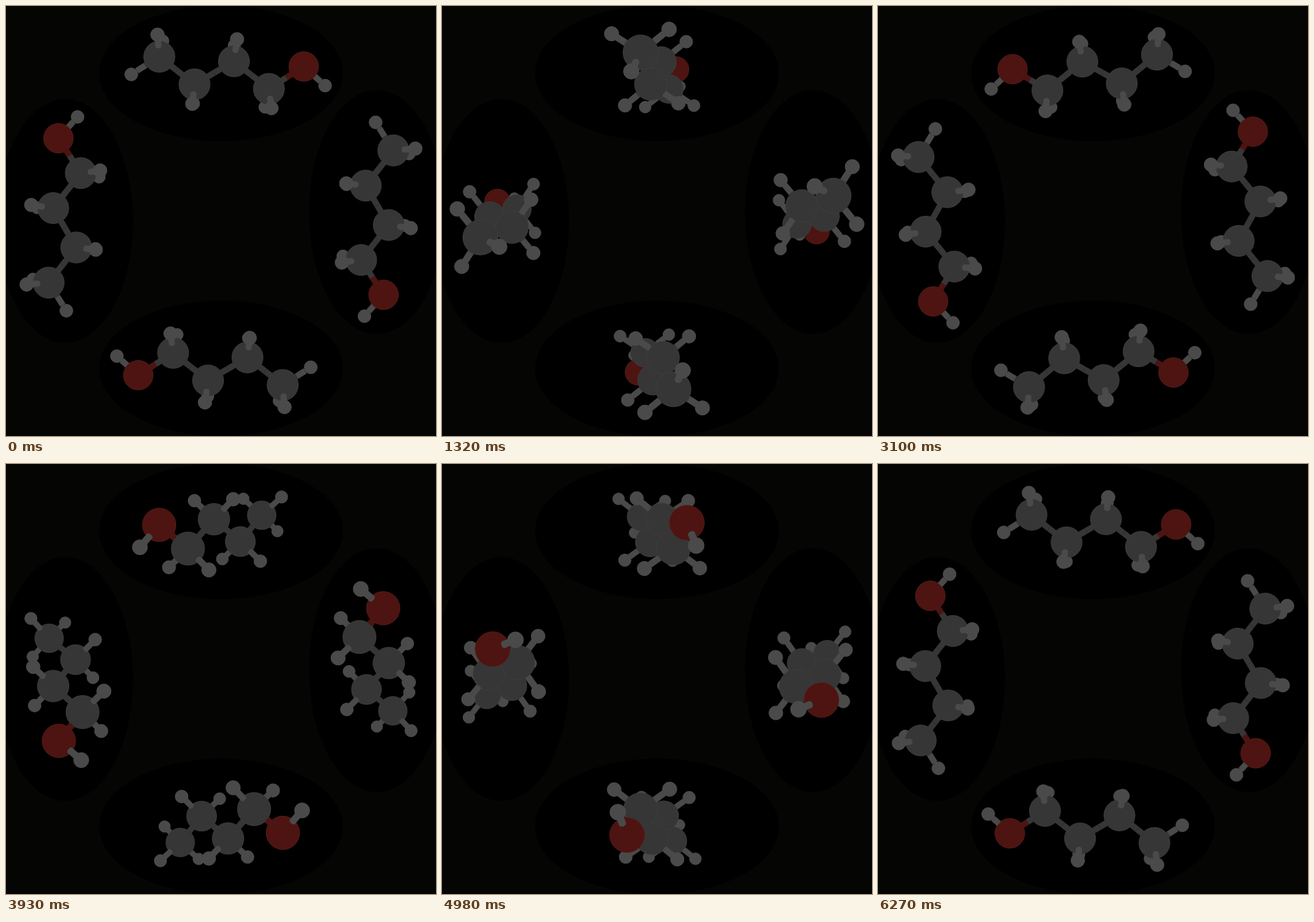
An HTML page with a canvas for the animation above (6300 ms loop, 748x748 px).

```html
<!DOCTYPE html>
<html lang="en">
<head>
<meta charset="utf-8">
<title>Rotating molecule, four views</title>
<style>
  html, body { margin: 0; width: 100%; height: 100%; overflow: hidden; background: #050504; }
  canvas { display: block; width: 748px; height: 748px; }
</style>
</head>
<body>
<canvas id="stage" width="748" height="748"></canvas>
<script>
const ctx = document.getElementById('stage').getContext('2d');

const LOOP = 6300, FRAMES = 191;
const CAMERA = 944;         // viewing distance in px
const AXIS_X = 2, HORIZON = 18, ROLL = 0.0165;
const BOND_RADIUS = 5.3;
const DEG = Math.PI / 180;

const KINDS = {
  C: { radius: 27.6, fill: '#363636', edge: '#3e3e3a' },
  O: { radius: 26.4, fill: '#4d1411', edge: '#571d19' },
  H: { radius: 11.8, fill: '#4a4a4a', edge: '#4c4c49' }
};

// kind, x, y, z, index of the atom it is bonded to
const ATOMS = [
  ['O', 142.5, -27.5, 0, 1],
  ['C', 81.5, 10.5, 0, 2],
  ['C', 20.5, -38.5, 0, 3],
  ['C', -48, 0.5, 0, 4],
  ['C', -109, -48.5, 0, -1],
  ['H', 180, 6.5, 0, 0],
  ['H', 80.3, 42, 48, 1],
  ['H', 79.5, 44.3, -46, 1],
  ['H', 23.5, -73, 45, 2],
  ['H', 23.5, -69.5, -47, 2],
  ['H', -50.5, 32.5, 47, 3],
  ['H', -51, 35.5, -44, 3],
  ['H', -157.5, -18.5, 0, 4],
  ['H', -108, -82.5, 45, 4],
  ['H', -107, -79.5, -48, 4]
].map(([kind, x, y, z, parent]) => ({ ...KINDS[kind], x, y, z, parent }));

// centre and turn of each copy
const VIEWS = [[374, 117, 0], [645, 358.5, 90], [374, 630.5, 180], [103, 374, -90]];

function rotate(atom, angle) {
  const c = Math.cos(angle), s = Math.sin(angle);
  return { ...atom, x: atom.x * c + atom.z * s + AXIS_X, z: atom.z * c - atom.x * s };
}

function project(p) {
  const scale = CAMERA / (CAMERA - p.z);
  const x = p.x * scale;
  return { x, y: HORIZON + p.y * scale - ROLL * x, scale };
}

function mix(a, b, t) {
  return { x: a.x + (b.x - a.x) * t, y: a.y + (b.y - a.y) * t, z: a.z + (b.z - a.z) * t };
}

function drawBall(atom) {
  const p = project(atom);
  ctx.beginPath();
  ctx.arc(p.x, p.y, atom.radius * p.scale - 0.5, 0, 2 * Math.PI);
  ctx.fillStyle = atom.fill;
  ctx.fill();
  ctx.strokeStyle = atom.edge;
  ctx.stroke();
}

// Cylinder between two points; slant rounds its ends by foreshortening
function drawRod(from, to, slant, fill) {
  const a = project(from), b = project(to);
  const dir = Math.atan2(b.y - a.y, b.x - a.x);
  const ra = BOND_RADIUS * a.scale, rb = BOND_RADIUS * b.scale;
  const nx = -Math.sin(dir), ny = Math.cos(dir);
  ctx.fillStyle = fill;
  ctx.beginPath();
  ctx.moveTo(a.x + nx * ra, a.y + ny * ra);
  ctx.lineTo(b.x + nx * rb, b.y + ny * rb);
  ctx.lineTo(b.x - nx * rb, b.y - ny * rb);
  ctx.lineTo(a.x - nx * ra, a.y - ny * ra);
  ctx.fill();
  for (const [p, r] of [[a, ra], [b, rb]]) {
    ctx.beginPath();
    ctx.ellipse(p.x, p.y, r * slant, r, dir, 0, 2 * Math.PI);
    ctx.fill();
  }
}

// Half a bond, from the surface of its atom to the middle
function halfBond(atom, other) {
  const dz = other.z - atom.z;
  const length = Math.hypot(other.x - atom.x, other.y - atom.y, dz);
  const from = mix(atom, other, Math.min(0.49, atom.radius * 0.97 / length));
  const to = mix(atom, other, 0.5);
  return {
    z: (from.z + to.z) / 2,
    draw: () => drawRod(from, to, Math.abs(dz) / length, atom.fill)
  };
}

function buildParts(angle) {
  const atoms = ATOMS.map(a => rotate(a, angle));
  const parts = atoms.map(a => ({ z: a.z, draw: () => drawBall(a) }));
  for (const a of atoms) {
    if (a.parent < 0) continue;
    const b = atoms[a.parent];
    parts.push(halfBond(a, b), halfBond(b, a));
  }
  return parts.sort((p, q) => p.z - q.z);
}

function draw(step) {
  const turn = step / FRAMES * 2 * Math.PI;
  const parts = buildParts(turn + 1.4 * DEG * (1 - Math.sin(turn)));
  ctx.fillStyle = '#050504';
  ctx.fillRect(0, 0, 748, 748);
  ctx.lineWidth = 1;
  for (const [x, y, deg] of VIEWS) {
    ctx.save();
    ctx.translate(x, y);
    ctx.rotate(deg * DEG);
    ctx.fillStyle = '#000';
    ctx.beginPath();
    ctx.ellipse(0, 0, 212, 118, 0, 0, 2 * Math.PI);
    ctx.fill();
    for (const part of parts) part.draw();
    ctx.restore();
  }
}

// Steps of 33 ms, rounded to hundredths of a second
function stepAt(ms) {
  const tick = Math.floor((ms % LOOP) / 10);
  return Math.ceil((tick + 0.5) / 3.3 - 1e-6) - 1;
}

const start = performance.now();
let shown = -1;
function loop() {
  const step = stepAt(performance.now() - start);
  if (step !== shown) draw(shown = step);
  requestAnimationFrame(loop);
}
loop();
</script>
</body>
</html>
```
